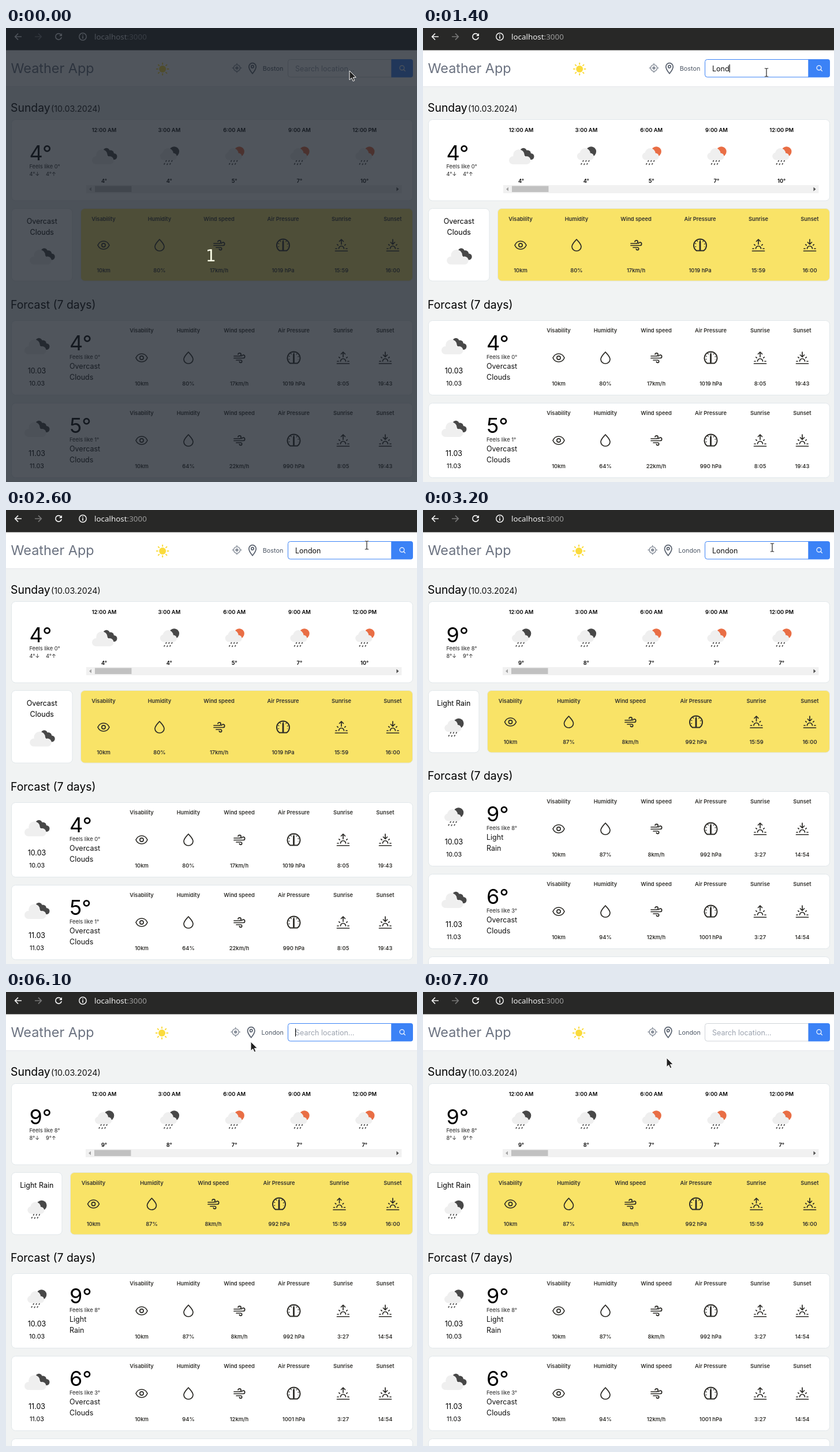
Recreate the animation shown at these times as an HTML page. Size 712x786 px, loop 8 s.

```html
<!DOCTYPE html>
<html lang="en">
<head>
<meta charset="utf-8">
<title>Weather App</title>
<style>
  html, body { margin: 0; width: 100%; height: 100%; overflow: hidden; background: #f1f3f3; }
  svg { display: block; width: 100vw; height: 100vh; font-family: Inter, sans-serif; }
  text { white-space: pre; }
  .line { fill: none; stroke: #2b2a26; stroke-width: 1.7; stroke-linecap: round; stroke-linejoin: round; }
</style>
</head>
<body>
<svg id="stage" viewBox="0 0 712 786"></svg>
<script>
const LOOP = 8000;
const BLUE = '#3b82f6';
const stage = document.getElementById('stage');

// ---- drawing helpers -------------------------------------------------
const at = (x, y, body) => `<g transform="translate(${x} ${y})">${body}</g>`;
const rect = (x, y, w, h, r, attrs) =>
  `<rect x="${x}" y="${y}" width="${w}" height="${h}" rx="${r}" ${attrs}/>`;
const circle = (x, y, r, attrs = '') => `<circle cx="${x}" cy="${y}" r="${r}" ${attrs}/>`;
const path = (d, attrs = '') => `<path d="${d}" ${attrs}/>`;
const text = (x, y, content, size, attrs = '') =>
  `<text x="${x}" y="${y}" font-size="${size}" ${attrs}>${content}</text>`;
const MID = 'text-anchor="middle" ';
const label = (x, y, content, color = '#33322e') =>
  text(x, y, content, 9.3, `${MID} font-weight="600" fill="${color}"`);
const card = (x, y, w, h, fill = '#fff') => rect(x, y, w, h, 7, `fill="${fill}" stroke="#e1e7ea"`);

// ---- weather icons, centred on 0,0 -----------------------------------
const drops = [[-5, 8.5], [0, 8.5], [5, 8.5], [-8, 13.5], [-3, 14], [2, 13.5]]
  .map(([x, y]) => `M${x} ${y}l-.8 1.5`).join('');
const rain = color =>
  circle(8.5, -7, 8.8, `fill="${color}"`) +
  `<g fill="#efefef">${circle(-9.5, 1, 6.5)}${circle(-2, -4, 9)}${circle(7, 1.5, 6)}` +
  rect(-10, -1, 17, 8.5, 3, '') + '</g>' +
  path(drops, 'stroke="#484848" stroke-width="1.6" stroke-linecap="round"');
const weather = {
  cloud:
    `<g fill="#484848">${circle(4, -7.5, 5.8)}${circle(11, -3.5, 6)}${circle(17, 1.5, 5.5)}</g>` +
    `<g fill="#efefef">${circle(-14, 8, 7)}${circle(-4, -1, 9.8)}${circle(9.5, 8, 7)}` +
    rect(-14, 5, 24, 10, 3, '') + '</g>',
  night: rain('#484848'),
  day: rain('#e96e45')
};

// ---- metric icons, centred on 0,0 ------------------------------------
const horizon = 'M-10.5 10H10.5M-4.5 6a4.5 4.5 0 0 1 9 0M-10 6h2M8 6h2M-7.2-1.2l1.4 1.4M7.2-1.2l-1.4 1.4';
const metrics = [
  ['Visability', path('M-10 0C-8-4.5-4-7 0-7S8-4.5 10 0C8 4.5 4 7 0 7S-8 4.5-10 0Z') + circle(0, 0, 3.1)],
  ['Humidity', path('M0-10C3-6.5 8-2 8 2.6A8 7.4 0 0 1-8 2.6C-8-2-3-6.5 0-10Z')],
  ['Wind speed', path('M-9-3H.5A2.6 2.6 0 1 0-2-6M-9 .5H7A2.7 2.7 0 1 0 4.4-3M-5 4H2.4A2.2 2.2 0 1 1 .3 6.6')],
  ['Air Pressure', path('M-6.3 9.4A11 11 0 1 1 6.3 9.4Z', 'stroke-width="2"') +
    path('M0-6V8', 'stroke-width="2.8"') +
    path('M-7.6 3A8.2 8.2 0 1 1 7.6 3', 'stroke-width="2.4" stroke-dasharray="1.2 4" stroke-linecap="butt"')],
  ['Sunrise', path(horizon + 'M0-1.5V-10M-3.5-6.5L0-10 3.5-6.5')],
  ['Sunset', path(horizon + 'M0-10V-1.5M-3.5-5L0-1.5 3.5-5')]
];
const metricRow = (columns, values, top, middle, bottom) => metrics.map(([name, icon], i) =>
  label(columns[i], top, name) +
  at(columns[i], middle, `<g class="line">${icon}</g>`) +
  label(columns[i], bottom, values[i])).join('');

// ---- pages -----------------------------------------------------------
const cities = {
  Boston: {
    now: 4, feels: 0, low: 4, high: 4, sky: ['Overcast', 'Clouds'], icon: 'cloud',
    hourTemps: [4, 4, 5, 7, 10], hourIcons: ['cloud', 'night', 'day', 'day', 'day'],
    panelX: 129, panelHeight: 126, columns: [169, 266, 369, 480, 581, 670], scrollX: 139,
    today: ['10km', '80%', '17km/h', '1019 hPa', '15:59', '16:00'],
    shift: 0,
    days: [
      ['10.03', 4, 0, 'cloud', ['Overcast', 'Clouds'], ['10km', '80%', '17km/h', '1019 hPa', '8:05', '19:43']],
      ['11.03', 5, 1, 'cloud', ['Overcast', 'Clouds'], ['10km', '64%', '22km/h', '990 hPa', '8:05', '19:43']]
    ]
  },
  London: {
    now: 9, feels: 8, low: 8, high: 9, sky: ['Light Rain'], icon: 'night',
    hourTemps: [9, 8, 7, 7, 7], hourIcons: ['night', 'night', 'day', 'day', 'day'],
    panelX: 111, panelHeight: 108, columns: [151.5, 252.5, 359, 473, 577.5, 670], scrollX: 138,
    today: ['10km', '87%', '8km/h', '992 hPa', '15:59', '16:00'],
    shift: -19,
    days: [
      ['10.03', 9, 8, 'night', ['Light', 'Rain'], ['10km', '87%', '8km/h', '992 hPa', '3:27', '14:54']],
      ['11.03', 6, 3, 'cloud', ['Overcast', 'Clouds'], ['10km', '94%', '12km/h', '1001 hPa', '3:27', '14:54']]
    ]
  }
};
const hours = ['12:00 AM', '3:00 AM', '6:00 AM', '9:00 AM', '12:00 PM'];
const dayColumns = [235, 316, 404, 498.5, 584, 657];

function hourly(c) {
  const s = c.scrollX;
  return card(9.5, 158.5, 695, 140.5) +
    text(40.5, 229, c.now + '°', 36) +
    text(40.5, 243, `Feels like ${c.feels}°`, 9.3, 'fill="#222"') +
    text(40.5, 256, c.low + '°↓', 9.3, 'fill="#222"') +
    text(69, 256, c.high + '°↑', 9.3, 'fill="#222"') +
    hours.map((hour, i) => {
      const x = 170 + i * 112.8;
      return label(x, 179.5, hour, '#000') + at(x, 221, weather[c.hourIcons[i]]) +
        label(x, 267.7, c.hourTemps[i] + '°', '#000');
    }).join('') +
    rect(s, 272, 685.5 - s, 14, 0, 'fill="#f1f1f1"') +
    rect(s + 15, 273.5, 63.5, 10.5, 0, 'fill="#c1c1c1"') +
    path(`M${s + 9} 275.5v7l-4-3.5z`, 'fill="#a3a3a3"') +
    path('M676.5 275.5v7l4-3.5z', 'fill="#505050"');
}

function today(c) {
  const width = c.panelX - 23.5, middle = 9.5 + width / 2, h = c.panelHeight;
  return card(9.5, 312.5, width, h - .5) +
    c.sky.map((line, i) => text(middle, 339 + i * 18.7, line, 12.5, MID)).join('') +
    at(middle, 268.5 + h, weather[c.icon]) +
    card(c.panelX + .5, 312.5, 704 - c.panelX, h - .5, '#f9e367') +
    metricRow(c.columns, c.today, 334.3, 313 + h / 2, 296.5 + h);
}

function forecast(c) {
  const days = c.days.map(([date, temp, feels, icon, sky, values], i) => at(0, i * 143,
    card(9.5, 506.5, 695, 129) +
    at(53, 550, weather[icon]) +
    text(53.5, 598, date, 12.5, MID) + text(53.5, 618.7, date, 10.8, MID) +
    text(110, 558, temp + '°', 36) +
    text(110, 573.3, `Feels like ${feels}°`, 9.3, 'fill="#222"') +
    sky.map((line, n) => text(110, 590.3 + n * 19, line, 12.5, 'fill="#111"')).join('') +
    metricRow(dayColumns, values, 527.4, 571, 618.5)));
  return at(0, c.shift, text(8, 486, 'Forcast (7 days)', 19.4) + days.join('') +
    card(9.5, 792.5, 695, 129));
}

const page = c => text(8, 145, 'Sunday', 19.4) + text(78, 145, '(10.03.2024)', 14.3, 'fill="#111"') +
  hourly(c) + today(c) + forecast(c);

function skeleton() {
  const bar = (x, y, w, h) => rect(x, y, w, h, 4, '');
  let out = bar(9, 126, 74, 19) + bar(87, 126, 74.5, 19) + bar(9, 245, 112.5, 25.5);
  for (let i = 0; i < 4; i++) {
    const x = 92.7 + i * 181.1;
    out += bar(x - 25, 151, 50, 18.5) + circle(x, 186, 9.4) + bar(x - 25, 201, 50, 19.5);
  }
  for (let i = 0; i < 7; i++) {
    const y = 283 + i * 43.8;
    out += bar(9, y, 87, 25) + circle(204.7, y + 16, 15.8) + bar(370, y, 88.5, 25) + bar(551.3, y, 88.5, 25);
  }
  return out;
}

// ---- fixed chrome and header -----------------------------------------
const toolbar = rect(0, 0, 712, 38.5, 0, 'fill="#282827"') +
  `<g fill="none" stroke="#f2f2f2" stroke-width="1.7">
    ${path('M27 15H16M21 9.7L15.7 15 21 20.3')}
    ${path('M50 15H61M56 9.7L61.3 15 56 20.3', 'stroke="#777"')}
    ${path('M95.3 11.8A5.2 5.2 0 1 0 96.2 15.8')}
    ${circle(133, 15, 6.2, 'stroke-width="1.5"')}${path('M133 14V18.4M133 11.2V12.8')}
  </g>` + path('M97 9V14H92Z', 'fill="#f2f2f2"') +
  `<text x="153" y="19.6" font-size="13.4" fill="#f0f0f0" style="font-family:'Noto Sans',sans-serif">localhost<tspan fill="#9b9b9b">:3000</tspan></text>`;

let rays = '';
for (let i = 0; i < 8; i++) rays += `<path d="M0-8.3V-10.3" transform="rotate(${i * 45})"/>`;
const sun = circle(0, 0, 6, 'fill="#fadb3c"') +
  `<g stroke="#fadb3c" stroke-width="2" stroke-linecap="round">${rays}</g>`;
const locate = '<g fill="none" stroke="#8b929d" stroke-width="1.5">' + circle(0, 0, 5.6) +
  path('M0-8.3V-5.6M0 8.3V5.6M-8.3 0H-5.6M8.3 0H5.6') + '</g>' + circle(0, 0, 2.7, 'fill="#8b929d"');
const pin = '<g fill="none" stroke="#5d6572" stroke-width="1.8">' +
  path('M0 9.3C-3 5.5-6.2 2-6.2-2.6A6.2 6.2 0 0 1 6.2-2.6C6.2 2 3 5.5 0 9.3Z') + circle(0, -2.6, 2.2) + '</g>';

const arrow = path('M0 0V15.8L3.7 12.4 6.2 18 8.8 16.9 6.4 11.4H11.3Z',
  'fill="#222" stroke="#fff" stroke-width="1"');
const beamLine = 'M-3.2-7H-1L0-6.2 1-7H3.2M0-6.2V6.2M-3.2 7H-1L0 6.2 1 7H3.2';
const beam = path(beamLine, 'fill="none" stroke="#fff" stroke-width="2.2" opacity=".7"') +
  path(beamLine, 'fill="none" stroke="#222" stroke-width="1.2"');

let menu = rect(-.5, 73.5, 155.5, 151, 4, 'fill="#fff" stroke="#cdd0d2"');
for (let i = 0; i < 5; i++) menu += text(9, 97 + i * 28.2, 'London', 12.5, 'fill="#111"');

stage.innerHTML = rect(0, 0, 712, 786, 0, 'fill="#f1f3f3"') +
  rect(0, 38, 712, 63, 0, 'fill="#fff"') + rect(0, 101, 712, 1, 0, 'fill="#e5e7eb"') + toolbar +
  text(8.5, 78, 'Weather App', 23.4, 'fill="#6b7280"') +
  `<g id="sun">${sun}</g><g id="locate">${locate}</g><g id="pin">${pin}</g>` +
  text(0, 73.6, '', 10.8, 'id="city" fill="#4b5563"') +
  `<g id="search">
    ${path('M668 54.5H492.5a4 4 0 0 0-4 4V81a4 4 0 0 0 4 4H668Z', 'id="field" fill="#fff"')}
    ${path('M667.5 54H701a4 4 0 0 1 4 4V81.5a4 4 0 0 1-4 4H667.5Z', `fill="${BLUE}"`)}
    <g fill="none" stroke="#fff" stroke-width="1.2">${circle(686, 69, 3.9)}${path('M689 72L691.8 74.8')}</g>
    ${text(501, 74.5, '', 12.5, 'id="query"')}
    ${rect(501, 63, 1.1, 14, 0, 'id="caret" fill="#000"')}
  </g>
  <g id="Boston">${page(cities.Boston)}</g>
  <g id="London">${page(cities.London)}</g>
  <g id="skeleton">${skeleton()}</g>
  <g id="menu">${menu}</g>
  <g id="dim">${rect(0, 0, 712, 786, 0, 'fill="#1a2029" opacity=".76"')}
    <text x="355" y="404" font-size="28" fill="#fbfde6" ${MID} style="font-family:'DejaVu Sans',sans-serif">1</text></g>
  <g id="arrow">${arrow}</g><g id="beam">${beam}</g>`;

// ---- animation -------------------------------------------------------
const $ = id => document.getElementById(id);
const show = (id, on) => $(id).setAttribute('display', on ? 'inline' : 'none');
const move = (id, x, y) => $(id).setAttribute('transform', `translate(${x} ${y})`);
const within = (t, ...spans) => spans.some(([from, to]) => t >= from && t < to);
const mix = (a, b, k) => a + (b - a) * k;

// time, x, y of the pointer
const pointer = [
  [0, 595, 74], [100, 595, 75], [400, 595, 75], [500, 595, 77], [1900, 595, 77],
  [2000, 631, 78], [2300, 634, 76], [2500, 634, 76], [2600, 625, 61], [2700, 625, 61],
  [2800, 618, 60], [3200, 605, 65], [3500, 600, 62], [4300, 600, 62], [4600, 584, 68],
  [4700, 584, 68], [4800, 578, 72], [5000, 578, 72], [5400, 553, 80], [5500, 553, 80],
  [6100, 424, 86], [6200, 414, 97], [6400, 394, 73], [7000, 394, 73], [7300, 422, 114], [LOOP, 422, 114]
];
function pointerAt(t) {
  const i = pointer.findIndex(key => key[0] > t);
  const [t0, x0, y0] = pointer[i - 1], [t1, x1, y1] = pointer[i];
  const k = (t - t0) / (t1 - t0);
  return [mix(x0, x1, k), mix(y0, y1, k)];
}

function render(now) {
  const t = Math.floor(now % LOOP / 100) * 100;
  const loading = within(t, [2000, 2600], [6900, 7700]);
  const city = t < 2800 ? 'Boston' : 'London';
  const focused = within(t, [700, 6500]);

  for (const name in cities) show(name, !loading && name === city);
  show('skeleton', loading);
  const fade = t < 2600 ? Math.min(1, (t - 2000) / 300) : 1;
  $('skeleton').setAttribute('fill', `rgb(${mix(207, 214, fade)},${mix(212, 219, fade)},${mix(215, 222, fade)})`);
  show('menu', within(t, [1600, 2600]));
  show('dim', t < 100);

  // without a page scrollbar the header grows wider
  const wide = loading ? 14.6 : 0, left = city === 'London' ? 2.3 : 0;
  move('sun', 271.2 - left / 2 + wide / 2, 71);
  move('locate', 400 - left + wide, 69.3);
  move('pin', 427 - left + wide, 69.5);
  move('search', wide, 0);
  $('city').setAttribute('x', 444.8 - left + wide);
  $('city').textContent = city;

  const typed = within(t, [1100, 4800]) ? 'London'.slice(0, (t - 1000) / 100) : '';
  $('query').textContent = typed || 'Search location...';
  $('query').setAttribute('fill', typed ? '#111' : '#9ca3af');
  $('field').setAttribute('stroke', focused ? BLUE : '#cfd3d8');
  show('caret', within(t, [700, 1600], [4000, 4600], [4800, 5100], [5300, 6500]));
  $('caret').setAttribute('x', 501 + (typed ? $('query').getComputedTextLength() : 0));

  const [x, y] = pointerAt(t);
  const overField = t >= 100 && x > 488;
  show('arrow', !overField);
  show('beam', overField);
  move(overField ? 'beam' : 'arrow', x, y);
}

const start = performance.now();
function tick() {
  render(performance.now() - start);
  requestAnimationFrame(tick);
}
render(0);
requestAnimationFrame(tick);
</script>
</body>
</html>
```
